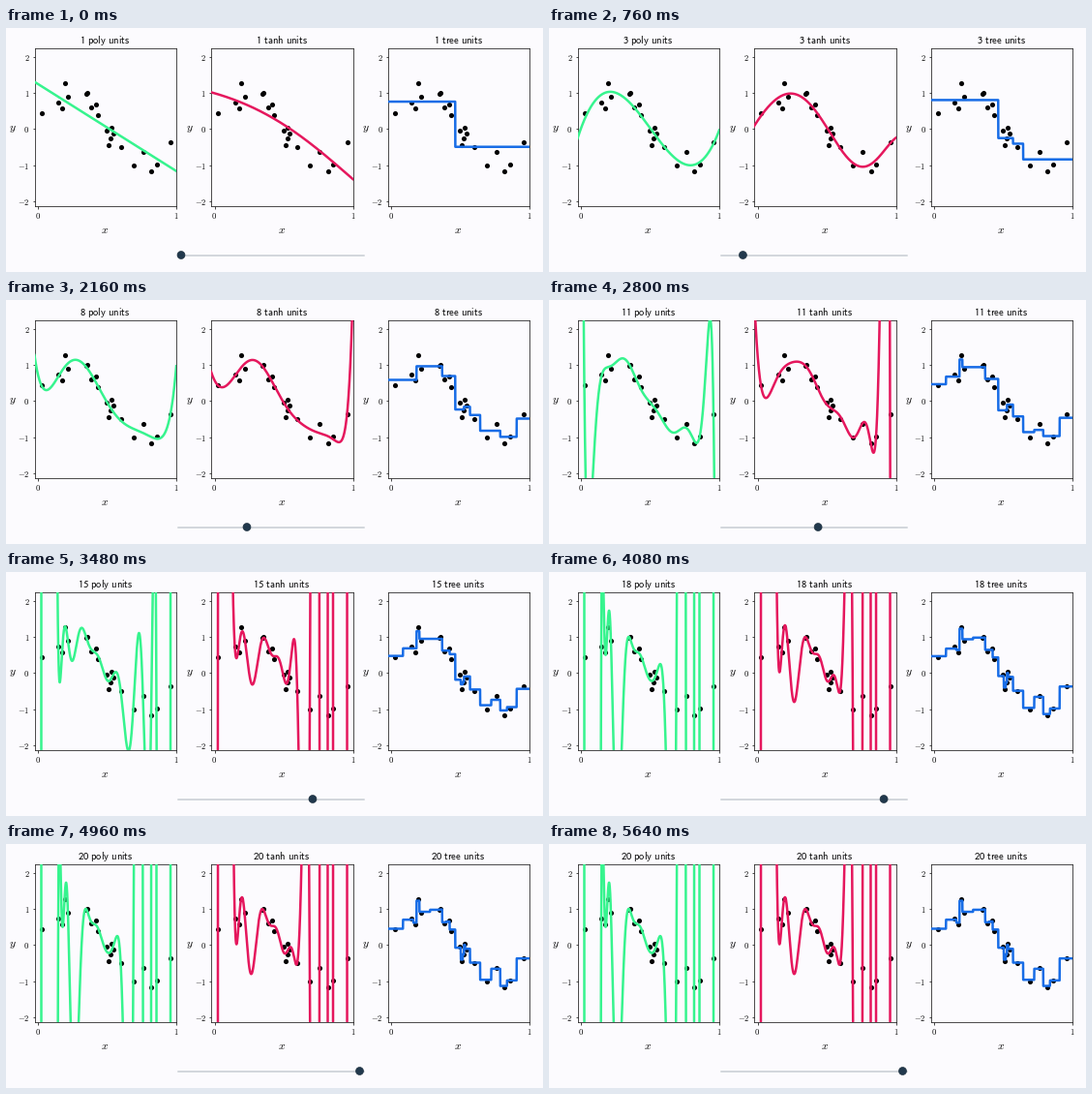
Animation, 555 px wide and 252 px high, one loop 5680 ms. Source, as a matplotlib script:

```python
import numpy as np
import matplotlib.pyplot as plt
from matplotlib.animation import FuncAnimation
from matplotlib.lines import Line2D
from matplotlib.patches import Circle

W, H, DPI = 555, 252, 100
FRAMES, INTERVAL = 142, 40
GREEN, PINK, BLUE = "#36f48e", "#e5175d", "#176ce6"
PAPER = "#fcfbfe"
X0, XS, Y0, YS = 33, 143, 104.4, 37.3  # pixel origin and scale of the first panel
LEFT, RIGHT, TOP, BOTTOM, STEP = 29.5, 176, 21, 184, 182.5
UNITS = 20

plt.rcParams["mathtext.fontset"] = "cm"


def to_data(px, py):
    return (np.asarray(px) - X0) / XS, (Y0 - np.asarray(py)) / YS


points = np.array([
    (36.5, 88), (54, 77), (58, 82.5), (60.5, 57), (64, 71), (82.5, 68),
    (83.5, 66.5), (88, 82), (92.5, 79), (94.5, 89.5), (104, 106),
    (106, 120.5), (108, 114), (108.5, 103), (110.5, 108.5), (118.5, 122.5),
    (131.5, 141.5), (141.5, 127.5), (150, 148), (155.5, 141), (170, 117.5)])
xd, yd = to_data(*points.T)
grid = np.linspace(-0.03, 1.01, 2000)


def least_squares(warp, degree):
    """Polynomial of the warped x fitted to the points."""
    fit = np.polynomial.Chebyshev.fit(warp(xd), yd, degree,
                                      domain=warp(np.array([0, 1])))
    return np.clip(fit(warp(grid)), -8, 8)


def poly(n):
    return least_squares(lambda x: x, min(n, 18))


def tanh(n):
    degree = np.interp(n, [1, 5, 11, 17], [1, 6, 11, 17])
    return least_squares(lambda x: np.tanh(1.15 * (x - 1)), round(degree))


def boosted_trees():
    """Boost one-split trees; keep the last curve for each number of cuts."""
    residual, line = yd.copy(), np.zeros_like(grid)
    size, cuts, curves = len(xd), set(), {}
    while len(cuts) < UNITS:
        k = np.argmax(np.abs(np.cumsum(residual)[:-1])) + 1
        cut = (xd[k - 1] + xd[k]) / 2
        low, high = residual[:k].mean(), residual[k:].mean()
        residual = residual - np.where(np.arange(size) < k, low, high)
        line = line + np.where(grid < cut, low, high)
        cuts.add(k)
        curves[len(cuts)] = line
    return [curves[n] for n in range(1, UNITS + 1)]


units = range(1, UNITS + 1)
panels = [("poly", GREEN, [poly(n) for n in units]),
          ("tanh", PINK, [tanh(n) for n in units]),
          ("tree", BLUE, boosted_trees())]

fig = plt.figure(figsize=(W / DPI, H / DPI), dpi=DPI, facecolor=PAPER)


def pt(px):
    return px * 72 / DPI


def label(x, y, s, size):
    return fig.text(x / W, 1 - y / H, s, fontsize=pt(size), ha="center",
                    va="baseline", color="black")


def heading(n, name):
    digits = "".join(chr(0x1D7E2 + int(d)) for d in str(n))  # sans digits
    return rf"$\mathrm{{{digits}}}\mathsf{{\ {name}\ units}}$"


titles, lines = [], []
for i, (name, color, curves) in enumerate(panels):
    dx = i * STEP
    ax = fig.add_axes([(LEFT + dx) / W, 1 - BOTTOM / H,
                       (RIGHT - LEFT) / W, (BOTTOM - TOP) / H])
    (xa, xb), (yb, yt) = to_data([LEFT, RIGHT], [BOTTOM, TOP])
    ax.set(xlim=(xa, xb), ylim=(yb, yt), facecolor=PAPER)
    ax.set_xticks([0, 1], ["$0$", "$1$"])
    ax.set_yticks(range(-2, 3), [f"${v}$" for v in range(-2, 3)])
    ax.tick_params(length=pt(2.5), width=pt(0.7), pad=pt(2.5),
                   labelsize=pt(8.5))
    for spine in ax.spines.values():
        spine.set(linewidth=pt(0.8), edgecolor="#222222")
    ax.plot(xd, yd, "o", color="black", ms=pt(5.1), mew=0, zorder=2)
    lines += ax.plot(grid, curves[0], color=color, lw=pt(2.5), zorder=3)
    titles.append(label(102.5 + dx, 16, heading(1, name), 10.5))
    label(102.5 + dx, 211.5, "$x$", 11.5)
    label(7 + dx, 105.5, "$y$", 11.5)

stage = fig.add_axes([0, 0, 1, 1])
stage.set(xlim=(0, W), ylim=(H, 0))
stage.axis("off")
stage.add_line(Line2D([177.5, 370], [234.5, 234.5], color="#d3d7dc",
                      lw=pt(2), solid_capstyle="round", zorder=1))
handle = stage.add_patch(Circle((181, 234.5), 4, fc="#22394d",
                                ec="#1a2c3a", lw=pt(0.6), zorder=3))


def update(frame):
    drag = np.interp(frame, [6, 34, 70, 87, 102, 116], [1, 5, 11, 15, 18, 20])
    n = int(drag + 0.5)
    for (name, _, curves), title, line in zip(panels, titles, lines):
        title.set_text(heading(n, name))
        line.set_ydata(curves[n - 1])
    handle.center = (181 + (n - 1) * 184.5 / (UNITS - 1), 234.5)
    return [*lines, *titles, handle]


anim = FuncAnimation(fig, update, frames=FRAMES, interval=INTERVAL,
                     repeat=True, repeat_delay=0, blit=False)
plt.show()
```
